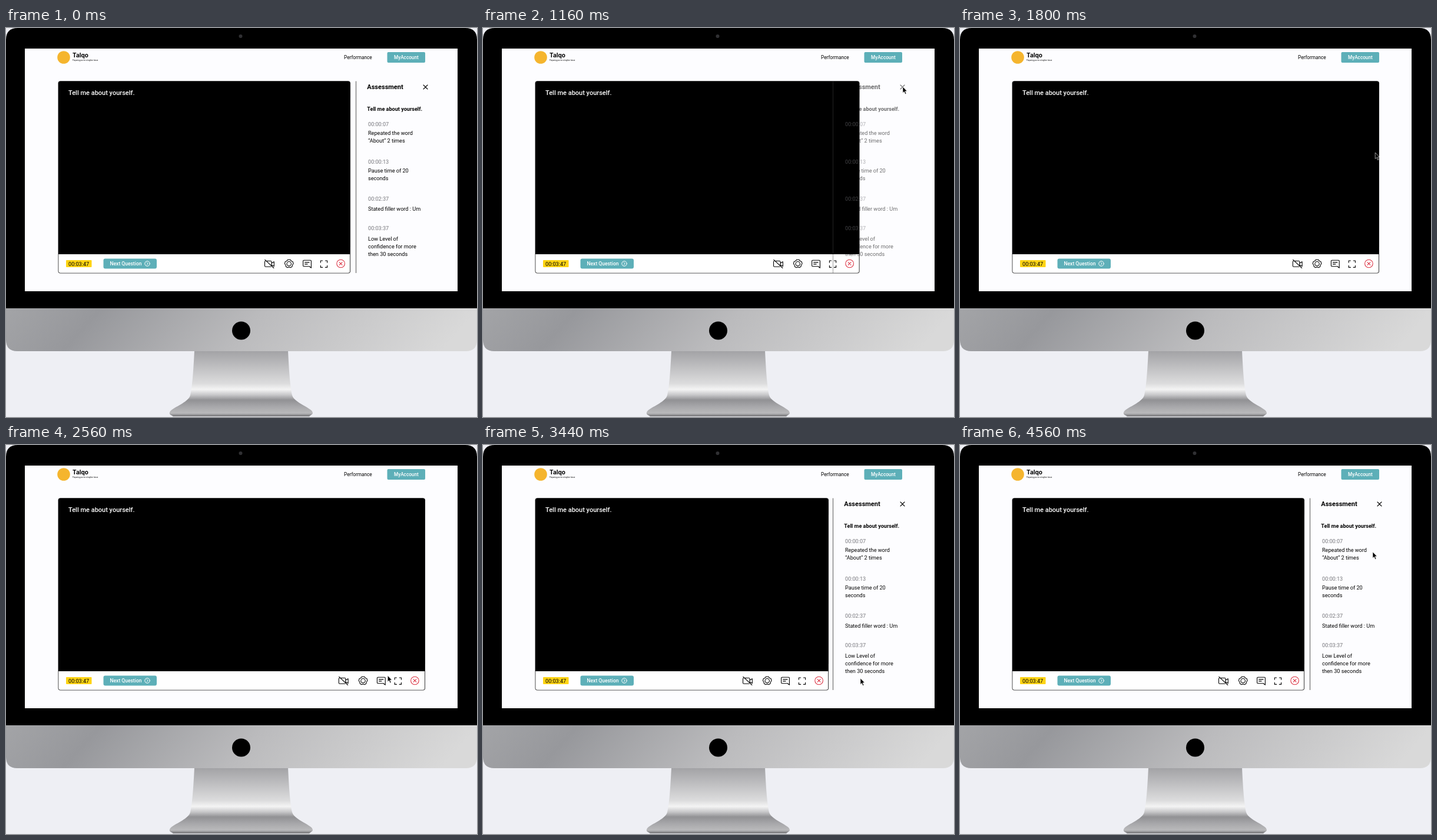
An HTML page for the animation above (4.6 s loop, 800 by 662 pixels).

```html
<!DOCTYPE html>
<html lang="en">
<head>
<meta charset="utf-8">
<title>Interview practice screen</title>
<style>
html, body { margin: 0; width: 100%; height: 100%; overflow: hidden; background: #eeeff4; }
svg { display: block; width: 800px; height: 662px; }
text { font: 9.15px Roboto, sans-serif; }
.line { fill: none; stroke: #000; stroke-width: 1.1; stroke-linejoin: round; stroke-linecap: round; }
.white { fill: #fff; }
.stamp { fill: #75757a; }
</style>
</head>
<body>
<svg viewBox="0 0 800 662">
  <defs>
    <linearGradient id="metal" x2="1" y2=".08">
      <stop stop-color="#a3a4a7"/>
      <stop offset=".2" stop-color="#97989c"/>
      <stop offset=".55" stop-color="#bbbbbd"/>
      <stop offset="1" stop-color="#d9d9d9"/>
    </linearGradient>
    <linearGradient id="stand" x2="0" y2="1">
      <stop stop-color="#a2a2a5"/>
      <stop offset=".25" stop-color="#bfbfc1"/>
      <stop offset=".5" stop-color="#dcdcdd"/>
      <stop offset=".59" stop-color="#f4f4f4"/>
      <stop offset=".67" stop-color="#c9c9cb"/>
      <stop offset=".75" stop-color="#919194"/>
      <stop offset=".86" stop-color="#a9a9ac"/>
      <stop offset=".95" stop-color="#b9b9bb"/>
      <stop offset="1" stop-color="#707073"/>
    </linearGradient>
  </defs>

  <!-- computer -->
  <path fill="url(#stand)" d="M320 549H479C481 590 483 612 486 625C489 636 510 643 519 651Q523 656 519 658L515 661H284L279 658Q276 655 280 651C290 643 310 636 313 625C316 612 318 590 320 549Z"/>
  <path d="M0 477V20Q0 0 20 0H780Q800 0 800 20V477Z"/>
  <path fill="url(#metal)" d="M0 477H800V531Q800 550 781 550H19Q0 550 0 531Z"/>
  <circle cx="398.5" cy="14" r="3" fill="#303033"/>
  <circle cx="399.5" cy="515" r="15.5"/>
  <rect x="32" y="35" width="735" height="413" fill="#fdfdff"/>

  <!-- header -->
  <circle cx="98" cy="50" r="10.8" fill="#f5b52e"/>
  <text x="113" y="50" style="font:700 10px Inter,sans-serif">Talqo</text>
  <text x="113" y="55.7" style="font-size:2.9px">Preparing you for a brighter future</text>
  <text x="574" y="53" style="font-size:8.25px">Performance</text>
  <rect x="647.5" y="41" width="64.5" height="18" rx="2" fill="#5dafb8"/>
  <text x="659" y="53" class="white" style="font-size:8.2px;font-weight:500">MyAccount</text>

  <!-- video -->
  <rect class="wide" data-trim="0" x="88.5" y="90.3" height="327.2" rx="4" fill="#222"/>
  <rect class="wide" data-trim="1.7" x="89.3" y="370" height="46.7" rx="3.3" fill="#fff"/>
  <rect class="wide" data-trim="1" x="89" y="90.8" height="30" rx="3.5"/>
  <rect class="wide" data-trim="1" x="89" y="98" height="287"/>
  <text x="106" y="114" class="white" style="font-size:11px;font-weight:500">Tell me about yourself.</text>

  <!-- toolbar -->
  <rect x="102" y="395" width="43.5" height="12" rx="1" fill="#ffd413"/>
  <text x="106" y="404.6">00:03:47</text>
  <rect x="165.5" y="392.5" width="90.5" height="17" rx="3" fill="#5dafb8"/>
  <text x="176.5" y="404" class="white" style="font-size:8.5px;font-weight:500">Next Question</text>
  <g class="line" style="stroke:#fff;stroke-width:1">
    <circle cx="240" cy="401" r="4.2"/>
    <path d="M239.2 399l2 2-2 2"/>
  </g>
  <g id="icons" class="line">
    <path d="M443 396.5H449.5Q451 396.5 451 398V404.5M450 406.3H441Q439.5 406.3 439.5 404.8V398Q439.5 396.5 441 396.5M451 400.3L455.3 397.8V405.6L451 403.2M439.8 394.3L454.8 408.5"/>
    <path d="M478.6 394.3H482.9L484.6 396.6L487.2 397.7L488 401.2L486.5 403.3L486 406L483.2 407.7L480.7 407L478.2 407.7L475.4 406L474.9 403.3L473.4 401.2L474.2 397.7L476.8 396.6Z"/>
    <circle cx="480.7" cy="401.2" r="3.7"/>
    <path d="M506 395.2H517Q518.4 395.2 518.4 396.6V408.2L515.3 405.7H506Q504.6 405.7 504.6 404.3V396.6Q504.6 395.2 506 395.2ZM507.7 398.9H515M507.7 401.9H512"/>
    <path d="M534.4 399.2V396H537.6M542.4 396H545.6V399.2M545.6 404.2V407.4H542.4M537.6 407.4H534.4V404.2"/>
    <g stroke="#dc3545">
      <circle cx="568.6" cy="401" r="6.8"/>
      <path d="M566.2 398.6l4.8 4.8M571 398.6l-4.8 4.8"/>
    </g>
  </g>

  <!-- assessment -->
  <g id="panel">
    <path d="M594.5 90.5V417" stroke="#444" stroke-width=".9"/>
    <text x="613.3" y="104" style="font-size:11px;font-weight:700">Assessment</text>
    <path class="line" d="M709 97l7 7M716 97l-7 7"/>
    <text x="613.3" y="141.3" style="font-size:9.1px;font-weight:700">Tell me about yourself.</text>
    <text x="615" y="167.2" class="stamp">00:00:07</text>
    <text x="615" y="181.7">Repeated the word</text>
    <text x="615" y="194.5">“About” 2 times</text>
    <text x="615" y="230.5" class="stamp">00:00:13</text>
    <text x="615" y="246.2">Pause time of 20</text>
    <text x="615" y="259">seconds</text>
    <text x="615" y="293.8" class="stamp">00:02:37</text>
    <text x="615" y="310.5">Stated filler word : Um</text>
    <text x="615" y="344.2" class="stamp">00:03:37</text>
    <text x="615" y="362">Low Level of</text>
    <text x="615" y="374.8">confidence for more</text>
    <text x="615" y="387.7">then 30 seconds</text>
  </g>

  <g id="cursor">
    <path id="arrow" stroke="#fff" stroke-width=".6" d="M0 0V10.5L2.4 8.3L4.2 12.5L5.9 11.8L4.1 7.7L7.2 7.5Z"/>
    <g id="hand" class="line" style="stroke-width:.9">
      <path fill="#fff" d="M-1.6 8.2L-2.7 2.2Q-2.8 .8 -1.7 .8Q-.8 .8 -.5 2L.5 5.4Q1.6 4.6 2.5 5.6Q3.7 4.8 4.6 5.9Q6.2 5.2 6.8 7L7.4 9.6Q7.5 11.3 6.4 12.3L6.2 13.7L.9 14L.3 12.8L-3.3 9.7Q-4 8.4 -2.9 7.9Z"/>
      <path stroke-width=".6" d="M1.7 9l.3 2.6M3.5 8.8l.2 2.6M5.2 8.6l.2 2.5"/>
    </g>
  </g>
</svg>
<script>
const LOOP = 4600, STEP = 40;
const $ = id => document.getElementById(id);
const bars = document.querySelectorAll('.wide');
const phase = (ms, start, length) => Math.min(1, Math.max(0, (ms - start) / length));
const ease = t => t + t * (1 - t) * (1.15 * t * t + .1 * t - .25);
const mix = (a, b, t) => a + (b - a) * t;

function pointer(ms) {
  if (ms < 680) {
    const t = ease(phase(ms, 80, 560));
    return [mix(801, 713, t), mix(182, 100.5, t)];
  }
  if (ms < 2640) {
    // curved way down: vertical slows while horizontal speeds up
    const t = phase(ms, 1480, 1120);
    return [mix(713, 644, t ** 1.74), mix(100, 395, 1 - (1 - t) ** 1.42)];
  }
  if (ms < 2960) return [641, 394];
  const t = phase(ms, 3480, 1080) ** 2.8;
  return [mix(641, 701, t), mix(397, 182, t)];
}

function draw(ms) {
  const wide = ease(phase(ms, 920, 560)) - ease(phase(ms, 2920, 560));
  for (const bar of bars) bar.setAttribute('width', 496.5 + 127 * wide - bar.dataset.trim);
  $('icons').setAttribute('transform', `translate(${125.8 * wide})`);
  $('panel').setAttribute('opacity', 1 - wide);

  const press = start => phase(ms, start, 160);
  const hand = press(640) - press(920) + press(2600) - press(2920);
  $('hand').setAttribute('opacity', hand);
  $('arrow').setAttribute('opacity', 1 - hand);
  $('cursor').setAttribute('transform', `translate(${pointer(ms)})`);
  $('cursor').setAttribute('visibility', ms < 120 ? 'hidden' : 'visible');
}

const begin = performance.now();
function tick() {
  const ms = (performance.now() - begin) % LOOP;
  draw(Math.floor(ms / STEP) * STEP);
  requestAnimationFrame(tick);
}
tick();
</script>
</body>
</html>
```
